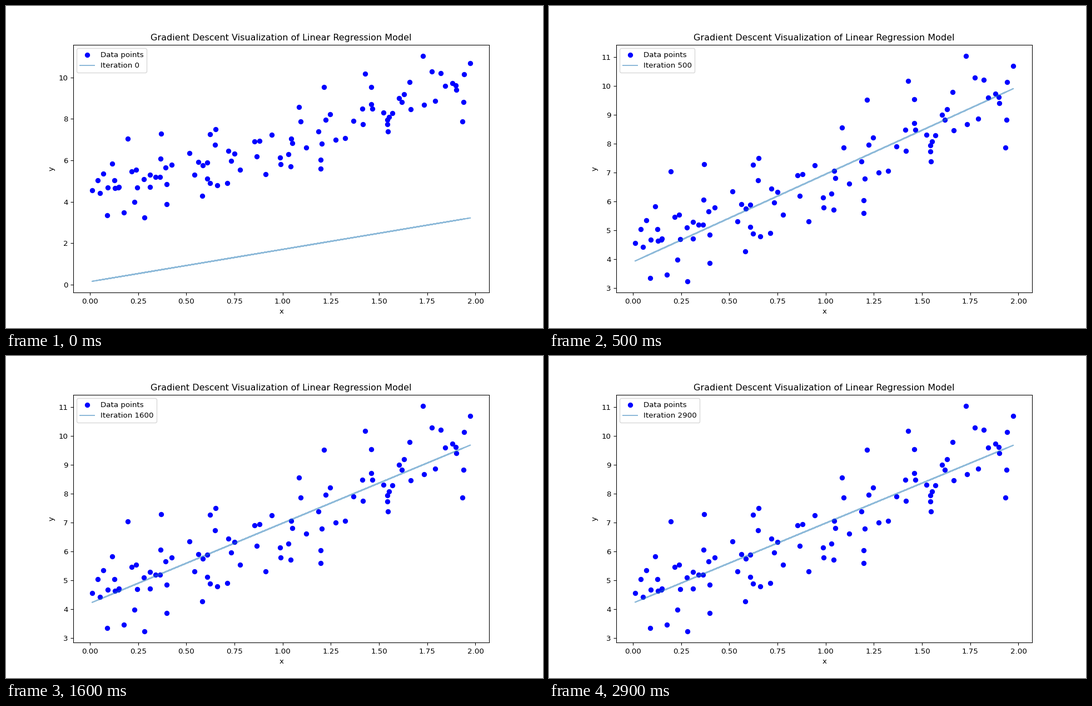
Animation, 966 px wide and 580 px high, one loop 3 s. Source, as a matplotlib script:

```python
import numpy as np
import matplotlib.pyplot as plt
from matplotlib.animation import FuncAnimation

WIDTH, HEIGHT, DPI = 966, 580, 96
FRAMES, INTERVAL = 30, 100
STEPS_PER_FRAME = 100
RATE = 0.01
START = (0.14, 1.56)  # intercept, slope

np.random.seed(42)
x = 2 * np.random.rand(100, 1)
y = 4 + 3 * x + np.random.randn(100, 1)
design = np.c_[np.ones_like(x), x]


def descend():
    """Return the model parameters at the start of every frame."""
    theta = np.array(START).reshape(2, 1)
    path = []
    for step in range(FRAMES * STEPS_PER_FRAME):
        if step % STEPS_PER_FRAME == 0:
            path.append(theta)
        gradient = 2 / len(x) * design.T @ (design @ theta - y)
        theta = theta - RATE * gradient
    return path


thetas = descend()
fig, ax = plt.subplots(figsize=(WIDTH / DPI, HEIGHT / DPI), dpi=DPI)


def draw(frame):
    ax.clear()
    ax.scatter(x, y, color="blue", label="Data points")
    ax.plot(x, design @ thetas[frame], alpha=0.5,
            label=f"Iteration {frame * STEPS_PER_FRAME}")
    ax.set_xlabel("x")
    ax.set_ylabel("y")
    ax.set_title("Gradient Descent Visualization of Linear Regression Model")
    ax.legend(loc="upper left")


anim = FuncAnimation(fig, draw, frames=FRAMES, interval=INTERVAL,
                     init_func=lambda: None, repeat=True, repeat_delay=0)
plt.show()
```
